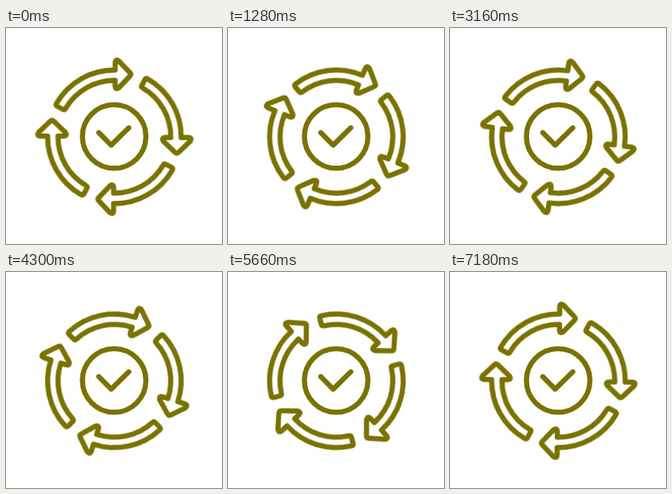
An HTML page for the animation above (7200 ms loop, 270 px wide and 270 px high).

```html
<!DOCTYPE html>
<html lang="en">
<head>
<meta charset="utf-8">
<title>Cycle check</title>
<style>
  html, body { margin: 0; width: 100%; height: 100%; overflow: hidden; background: #fff; }
  svg { display: block; width: 100vw; height: 100vh; }
  .icon { fill: none; stroke: #7a7200; stroke-width: 6.4; stroke-linecap: round; stroke-linejoin: round; }
  .ring { transform-origin: 0 0; animation: spin 7200ms linear infinite; }
  /* A little over seven quarter turns, so the loop ends with a tiny jump. */
  @keyframes spin {
    from { transform: rotate(0deg); }
    to { transform: rotate(632.2deg); }
  }
</style>
</head>
<body>
<svg viewBox="0 0 270 270">
  <defs>
    <path id="arrow" d="M-72.3 -41.8 A83.5 83.5 0 0 1 .8 -83.5 V-92 Q.8 -97.6 5.4 -94.8
      L19.2 -80.3 Q21.4 -78 19.2 -75.7 L5.4 -61.2 Q.8 -58.4 .8 -64 V-70.5
      A70.5 70.5 0 0 0 -61 -35.3 Q-62.2 -33.1 -64.4 -34.3
      L-71.5 -38 Q-73.7 -39.2 -72.3 -41.8 Z"/>
  </defs>
  <g class="icon">
    <g transform="translate(135.5 136)">
      <g class="ring">
        <use href="#arrow"/>
        <use href="#arrow" transform="rotate(90)"/>
        <use href="#arrow" transform="rotate(180)"/>
        <use href="#arrow" transform="rotate(270)"/>
      </g>
    </g>
    <g transform="translate(135.2 135.6)">
      <circle r="39.7"/>
      <path d="M-19.2 -4.8 L-3.7 10.8 L18.3 -10.8"/>
    </g>
  </g>
</svg>
</body>
</html>
```
